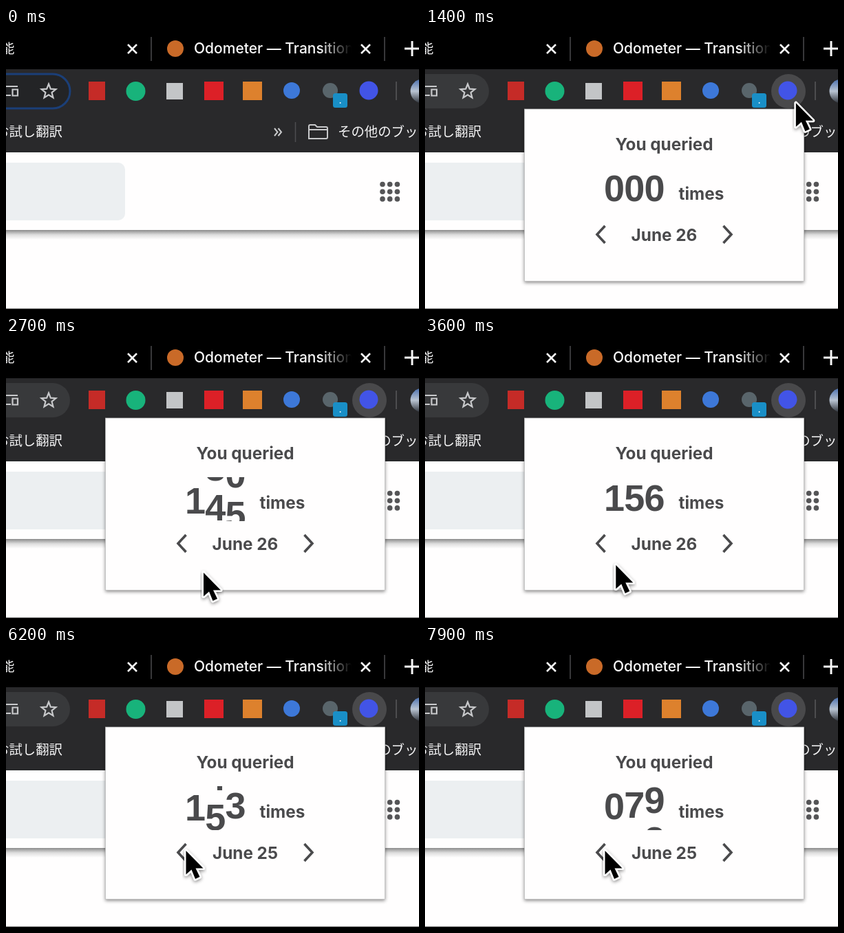
Animation, 600 px wide and 409 px high, one loop 8000 ms. Source, as an HTML page:

```html
<!DOCTYPE html>
<html lang="en">
<head>
<meta charset="utf-8">
<title>Search counter</title>
<style>
  html, body { margin: 0; width: 100%; height: 100%; overflow: hidden; background: #fff; }
  svg { display: block; width: 600px; height: 409px; }
  text { font-family: Inter, "Noto Sans CJK JP", "Noto Sans CJK", sans-serif; }
  .bar { font-size: 19.4px; font-weight: 500; fill: #f4f4f5; }
  .tab { font-size: 21px; font-weight: 500; }
  .label { font-size: 24.3px; font-weight: 700; fill: #4a4a4c; }
  .digit { font: bold 54px "Liberation Sans", Arial, sans-serif; fill: #4a4a4c; text-anchor: middle; }
  .middle { text-anchor: middle; }
  .line { fill: none; stroke: #c8c9cb; stroke-width: 2.2; }
  .cross { fill: none; stroke: #f8f8f8; stroke-width: 2.6; }
  .chevron { fill: none; stroke: #4a4a4c; stroke-width: 3.6; }
</style>
</head>
<body>
<svg viewBox="0 0 600 409" xmlns="http://www.w3.org/2000/svg">
  <defs>
    <linearGradient id="fade" gradientUnits="userSpaceOnUse" x1="455" x2="502" y1="0" y2="0">
      <stop stop-color="#fafafa"/><stop offset="1" stop-color="#fafafa" stop-opacity="0"/>
    </linearGradient>
    <linearGradient id="under" x2="0" y2="1">
      <stop stop-color="#8a8a8a"/><stop offset=".15" stop-color="#a4a4a4"/>
      <stop offset=".5" stop-color="#dedede"/><stop offset="1" stop-color="#fffefe"/>
    </linearGradient>
    <linearGradient id="photo" x2="0" y2="1">
      <stop stop-color="#4a6fae"/><stop offset=".5" stop-color="#b9c4d2"/><stop offset="1" stop-color="#30343c"/>
    </linearGradient>
    <filter id="soft" x="-20%" y="-20%" width="140%" height="150%">
      <feDropShadow dx="0" dy="2" stdDeviation="2.5" flood-opacity=".45"/>
    </filter>
    <clipPath id="window"><rect x="250" y="204" width="110" height="64"/></clipPath>
    <clipPath id="title"><rect x="270" y="0" width="232" height="60"/></clipPath>
  </defs>

  <!-- Page -->
  <rect width="600" height="409" fill="#fffefe"/>
  <rect x="-20" y="196" width="193" height="84" rx="10" fill="#eceff1"/>
  <g id="dots" fill="#555557"></g>
  <rect y="294" width="600" height="14" fill="url(#under)"/>
  <rect y="408" width="600" height="1" fill="#777"/>

  <!-- Tabs -->
  <rect width="600" height="60" fill="#000"/>
  <text class="bar" x="-7" y="37">能</text>
  <path class="cross" d="M177 24l13 13m0-13l-13 13M516 24l13 13m0-13l-13 13"/>
  <path class="cross" style="stroke-width:3" d="M579 30h22M590 19v22"/>
  <path d="M211 13v35M550 13v35" stroke="#4b4b4d" stroke-width="1.5"/>
  <circle cx="246" cy="30" r="12" fill="#c96a28"/>
  <text class="tab" x="273" y="37" fill="url(#fade)" clip-path="url(#title)">Odometer — Transition</text>

  <!-- Toolbar -->
  <rect y="60" width="600" height="121" fill="#29292b"/>
  <rect id="address" x="-60" y="67" width="153" height="50" rx="25"/>
  <path class="line" d="M-4 85H17M-4 98H7M9.500 89.500h7.500v9h-7.500z"/>
  <path id="star" class="line"/>
  <rect x="120" y="78" width="24" height="27" fill="#c52b27"/>
  <circle cx="188.500" cy="92" r="14" fill="#18b37b"/>
  <rect x="233" y="80" width="24" height="24" fill="#c3c5c7"/>
  <rect x="288" y="78" width="28" height="27" fill="#dc2027"/>
  <rect x="344" y="78" width="28" height="27" fill="#dd812d"/>
  <circle cx="415" cy="91" r="12" fill="#3d78d8"/>
  <circle cx="471" cy="91" r="11" fill="#59656b"/>
  <rect x="475" y="95" width="21" height="21" rx="3.500" fill="#198fc7"/>
  <text class="bar middle" x="485.500" y="110" style="font-size:14px;fill:#fff">.</text>
  <circle id="hover" cx="528" cy="92" r="25" fill="#49494b"/>
  <circle cx="527" cy="91" r="13.500" fill="#4254e6"/>
  <path d="M567 78v27" stroke="#5a5a5c" stroke-width="1.500"/>
  <circle cx="605" cy="92" r="17.500" fill="url(#photo)"/>
  <text class="bar" x="-15" y="158">お試し翻訳</text>
  <path class="line" style="stroke-width:2" d="M390 146l4.500 5.500-4.500 5.500M395.500 146l4.500 5.500-4.500 5.500"/>
  <path d="M420.500 137v29" stroke="#4e4e50" stroke-width="1.500"/>
  <path class="line" style="stroke-width:2" d="M440 161V143q0-2 2-2h7l3 3h13q2 0 2 2v13q0 2-2 2zM440 148h27"/>
  <text class="bar" x="482" y="158">その他のブックマーク</text>

  <!-- Popup -->
  <g id="popup">
    <rect x="144.500" y="118" width="406" height="250.500" fill="#fffefe" stroke="#b4b4b4" stroke-width=".7" filter="url(#soft)"/>
    <text class="label middle" x="347.500" y="178">You queried</text>
    <g clip-path="url(#window)" id="counter"></g>
    <text id="times" class="label" x="368.500" y="250">times</text>
    <text id="date" class="label middle" x="347.500" y="310"></text>
    <path class="chevron" d="M261.500 288l-11.500 12.500 11.500 12.500M433.500 288l11.500 12.500-11.500 12.500"/>
  </g>

  <path id="cursor" d="M0 0V34.500L8 27.500 13.500 41 20 38 14 25.500H25Z" fill="#000" stroke="#fff"
    stroke-width="5" stroke-linejoin="round" paint-order="stroke" filter="url(#soft)"/>
</svg>

<script>
const LOOP = 8000, PITCH = 58, MAX_STEPS = 29, ROLL = 2000;
const OPEN = 1000, ROLL_UP = 1400, CLICK = 5700, ROLL_DOWN = 6100;
const DIGIT_X = 275, DIGIT_GAP = 29.3, BASELINE = 252.5;
const $ = id => document.getElementById(id);

function add(parent, name, attrs, content = '') {
  const el = document.createElementNS('http://www.w3.org/2000/svg', name);
  for (const key in attrs) el.setAttribute(key, attrs[key]);
  el.textContent = content;
  return parent.appendChild(el);
}
const addDigit = (parent, column, y, value) =>
  add(parent, 'text', { class: 'digit', x: DIGIT_X + DIGIT_GAP * column, y }, value);
const show = (el, on) => el.setAttribute('visibility', on ? 'inherit' : 'hidden');

for (let i = 0; i < 9; i++)
  add($('dots'), 'circle', { cx: 547 + i % 3 * 10.7, cy: 227.5 + Math.floor(i / 3) * 10.7, r: 3.8 });

const starPoint = (_, i) => {
  const r = i % 2 ? 4.8 : 11, a = Math.PI * (i / 5 - .5);
  return `${62 + r * Math.cos(a)} ${92.5 + r * Math.sin(a)}`;
};
$('star').setAttribute('d', `M${Array.from({ length: 10 }, starPoint).join('L')}Z`);

// Each column is a ribbon of digits; long counts skip values.
function makeRoll(from, to) {
  const group = add($('counter'), 'g', {});
  const columns = [100, 10, 1].map((unit, i) => {
    const start = Math.floor(from / unit), dist = Math.floor(to / unit) - start;
    const steps = Math.min(Math.abs(dist), MAX_STEPS), dir = Math.sign(dist);
    const ribbon = add(group, 'g', {});
    for (let k = 0; k <= steps; k++)
      addDigit(ribbon, i, BASELINE + dir * k * PITCH, Math.round(start + dist * k / steps) % 10);
    return { ribbon, travel: -dir * steps * PITCH };
  });
  return {
    group,
    move: p => columns.forEach(c => c.ribbon.setAttribute('transform', `translate(0 ${c.travel * p})`))
  };
}
const zero = addDigit($('counter'), 1, BASELINE, 0);
const up = makeRoll(0, 156), down = makeRoll(156, 79);

// cubic-bezier(.25, .1, .25, 1)
function ease(x) {
  if (x <= 0) return 0;
  if (x >= 1) return 1;
  let lo = 0, hi = 1;
  for (let i = 0; i < 24; i++) {
    const u = (lo + hi) / 2;
    if (.75 * u * (1 - u) + u ** 3 < x) lo = u; else hi = u;
  }
  return .3 * lo * (1 - lo) ** 2 + 3 * lo * lo * (1 - lo) + lo ** 3;
}

const smooth = p => p * p * (3 - 2 * p), slowStart = p => p ** 1.5, slowEnd = p => 1 - (1 - p) ** 2;
const path = [
  { at: 50, x: 608, y: 280 },
  { at: 850, x: 544, y: 103, by: slowEnd },
  { at: 1350, x: 544, y: 103 },
  { at: 1900, x: 362, y: 322, by: slowStart },
  { at: 2200, x: 287, y: 343, by: slowEnd },
  { at: 3200, x: 287, y: 343 },
  { at: 4200, x: 259.5, y: 312, by: smooth },
  { at: 5100, x: 259.5, y: 312 },
  { at: 5650, x: 261.5, y: 298, by: smooth }
];
function cursorAt(t) {
  const i = path.findIndex(k => k.at > t);
  if (i < 0) return path[path.length - 1];
  if (i === 0) return path[0];
  const a = path[i - 1], b = path[i], p = (t - a.at) / (b.at - a.at), q = b.by ? b.by(p) : p;
  return { x: a.x + (b.x - a.x) * q, y: a.y + (b.y - a.y) * q };
}

function draw(t) {
  const open = t >= OPEN, rolling = t >= ROLL_UP, falling = t >= ROLL_DOWN;
  const { x, y } = cursorAt(t);
  show($('cursor'), t >= 50);
  $('cursor').setAttribute('transform', `translate(${x} ${y})`);
  show($('hover'), open || Math.hypot(x - 528, y - 92) < 27);
  show($('popup'), open);
  $('address').setAttribute('fill', open ? '#38393b' : '#232426');
  $('address').setAttribute('stroke', open ? 'none' : '#1b3f78');
  $('address').setAttribute('stroke-width', 3);

  show(zero, !rolling);
  show(up.group, rolling && !falling);
  show(down.group, falling);
  up.move(ease((t - ROLL_UP) / ROLL));
  down.move(ease((t - ROLL_DOWN) / ROLL));
  $('times').setAttribute('x', rolling ? 368.5 : 339.2);
  $('date').textContent = t < CLICK ? 'June 26' : 'June 25';
}

const began = performance.now();
function tick() {
  draw((performance.now() - began) % LOOP);
  requestAnimationFrame(tick);
}
tick();
</script>
</body>
</html>
```
